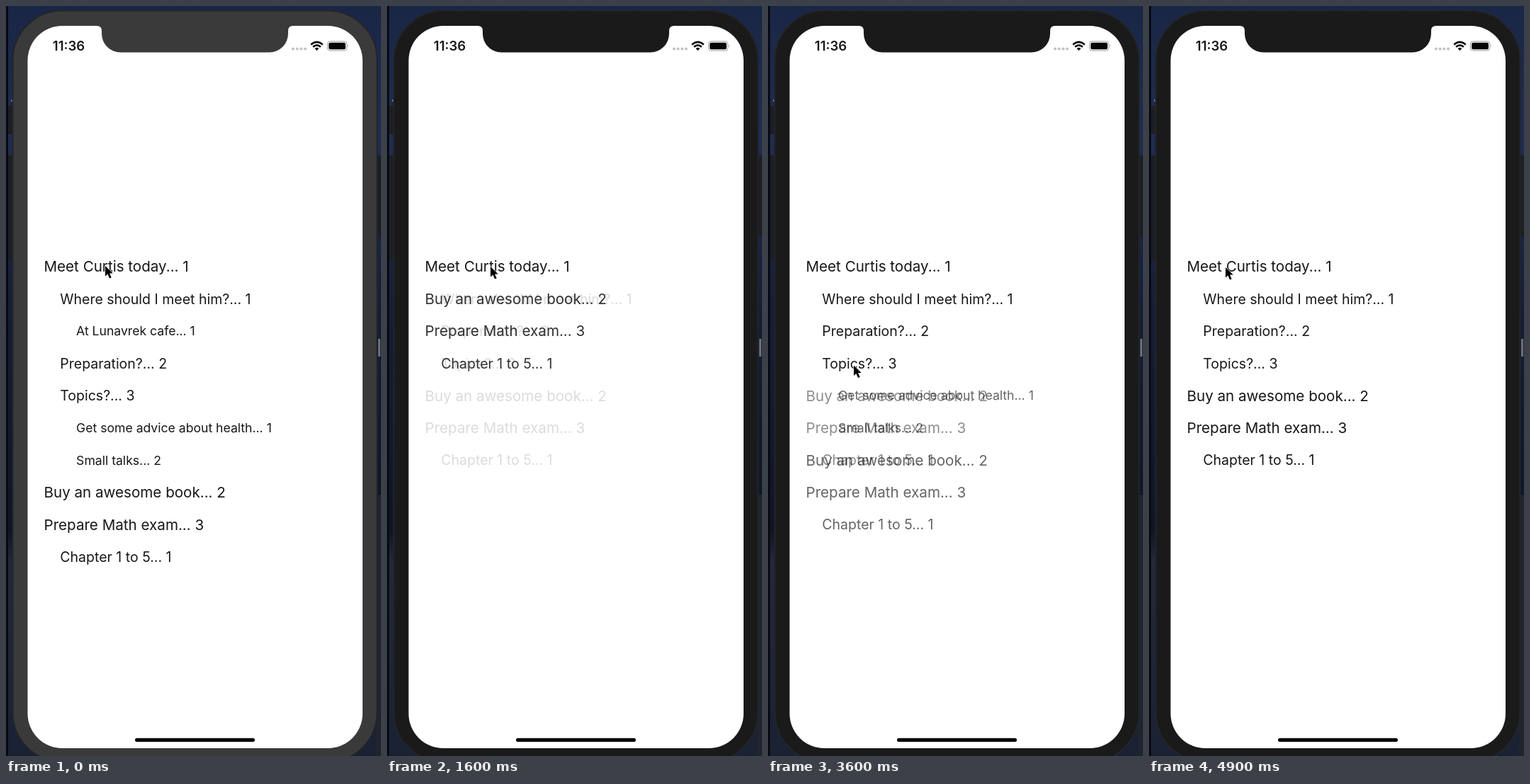
Write an HTML page that moves like this. It is 529 px wide and 1059 px high and loops after 5000 ms.

```html
<!DOCTYPE html>
<html lang="en">
<head>
<meta charset="utf-8">
<title>Outline list</title>
<style>
  html, body { margin: 0; width: 100%; height: 100%; overflow: hidden; background: #18233f; }
  svg { display: block; width: 529px; height: 1059px; }
  text { font-family: Inter, "Open Sans", sans-serif; fill: #171717; white-space: pre; }
</style>
</head>
<body>
<svg viewBox="0 0 529 1059" xmlns="http://www.w3.org/2000/svg">
  <defs>
    <linearGradient id="desk" x1="0" y1="0" x2="0" y2="1">
      <stop offset="0" stop-color="#1a2645"/>
      <stop offset=".18" stop-color="#202d50"/>
      <stop offset=".4" stop-color="#161e36"/>
      <stop offset=".7" stop-color="#0f1525"/>
      <stop offset=".74" stop-color="#23293a"/>
      <stop offset="1" stop-color="#1a2133"/>
    </linearGradient>
  </defs>

  <rect width="529" height="1059" fill="url(#desk)"/>
  <g fill="#1d1e22">
    <rect x="3" y="141" width="8" height="40"/>
    <rect x="3" y="211" width="8" height="148"/>
    <rect x="521" y="211" width="8" height="115"/>
  </g>
  <rect x="7" y="132" width="2" height="3" fill="#77809a"/>
  <rect x="525" y="470" width="3" height="25" fill="#6d7078"/>
  <rect x="522" y="690" width="7" height="369" fill="#20242e"/>
  <rect width="3" height="1059" fill="#080b14"/>

  <rect id="body" x="9.5" y="6.5" width="514" height="1061" rx="70" stroke="#22252d" stroke-width="2"/>
  <rect x="30.5" y="28" width="472.5" height="1020" rx="49" fill="#fff"/>
  <path id="notch" d="M128 27 V28 Q135 28 135 35 V39 A26.5 26.5 0 0 0 161.5 65.5 H371.5 A26.5 26.5 0 0 0 398 39 V35 Q398 28 405 28 V27 Z"/>

  <text x="65.8" y="63.3" font-size="18.6" font-weight="600">11:36</text>
  <path d="M405 60.5 h18" stroke="#c4c4c6" stroke-width="4.2" stroke-linecap="round" stroke-dasharray="0 5.7"/>
  <g fill="none" stroke="#0a0a0a" stroke-width="2.5">
    <path d="M430.2 54.6 Q438.5 47.2 446.8 54.6"/>
    <path d="M433.1 57.7 Q438.5 53 443.9 57.7"/>
  </g>
  <path d="M435.6 59.9 Q438.5 57.6 441.4 59.9 L438.5 63 Z" fill="#0a0a0a"/>
  <rect x="453.4" y="50" width="27.4" height="13" rx="3.8" fill="none" stroke="#9b9b9d"/>
  <rect x="455.2" y="51.8" width="23.8" height="9.4" rx="2.2" fill="#050505"/>
  <path d="M482 54.3 q1.8 2.2 0 4.4 z" fill="#9b9b9d"/>

  <g id="list"></g>
  <rect x="182" y="1033.7" width="169" height="5.2" rx="2.6" fill="#050505"/>
  <path id="cursor" d="M0 0 V14.6 L3.4 11.5 L6 17.6 L8.7 16.4 L6.1 10.5 H10.8 Z"
        stroke="#fff" stroke-width="1.2" stroke-opacity=".85" paint-order="stroke"/>
</svg>

<script>
const LOOP = 5000, STEP = 100, FADE = 350;
const LEFT = 53.5, INDENT = 22.8, TOP = 368, PITCH = 45.53;
const SIZES = [20.6, 19.5, 17.6];

// Leading spaces give the outline depth
const OUTLINE = [
  "Meet Curtis today... 1",
  " Where should I meet him?... 1",
  "  At Lunavrek cafe... 1",
  " Preparation?... 2",
  " Topics?... 3",
  "  Get some advice about health... 1",
  "  Small talks... 2",
  "Buy an awesome book... 2",
  "Prepare Math exam... 3",
  " Chapter 1 to 5... 1"
].map(line => ({ label: line.trim(), depth: line.search(/\S/) }));

// Each tap sets which rows are folded
const VIEWS = [
  { at: -Infinity, folded: [] },
  { at: 500, folded: [0] },
  { at: 1560, folded: [1, 4] },
  { at: 3420, folded: [1] },
  { at: 4330, folded: [1, 4] }
];

// Straight pointer moves between rests
const MOVES = [
  { from: 500, to: 1000, x: 146, y: 368 },
  { from: 2000, to: 2200, x: 170, y: 427 },
  { from: 2200, to: 2600, x: 121, y: 472 },
  { from: 2600, to: 2900, x: 121, y: 510 },
  { from: 3400, to: 3500, x: 121, y: 507.5 },
  { from: 4500, to: 4900, x: 108, y: 369 }
];

const $ = id => document.getElementById(id);
const progress = (t, from, to) => Math.min(1, Math.max(0, (t - from) / (to - from)));

function visibleRows(folded) {
  let limit = Infinity;
  return OUTLINE.filter((row, i) => {
    if (row.depth > limit) return false;
    limit = folded.includes(i) ? row.depth : Infinity;
    return true;
  });
}

function addText(row, slot) {
  const el = document.createElementNS("http://www.w3.org/2000/svg", "text");
  const size = SIZES[row.depth];
  el.setAttribute("x", LEFT + row.depth * INDENT);
  el.setAttribute("y", TOP + slot * PITCH + size * 0.36);
  el.setAttribute("font-size", size);
  el.textContent = row.label;
  $("list").append(el);
  return el;
}

// A row that keeps its slot across views is one element and stays solid
const items = new Map();
VIEWS.forEach((view, v) => visibleRows(view.folded).forEach((row, slot) => {
  const key = row.label + slot;
  if (!items.has(key)) items.set(key, { el: addText(row, slot), views: [] });
  items.get(key).views.push(v);
}));

// The new view comes in a little faster than the old one leaves
function viewAlpha(t, v) {
  const shown = t - VIEWS[v].at;
  const gone = v + 1 < VIEWS.length ? t - VIEWS[v + 1].at : 0;
  return Math.min(1, 1.3 * progress(shown, 0, FADE)) * (1 - progress(gone, 0, FADE));
}

function pointer(t) {
  let x = 140, y = 367;
  for (const m of MOVES) {
    const p = progress(t, m.from, m.to);
    x += (m.x - x) * p;
    y += (m.y - y) * p;
  }
  return `translate(${x} ${y})`;
}

function draw(t) {
  const alpha = VIEWS.map((_, v) => viewAlpha(t, v));
  for (const { el, views } of items.values()) {
    el.setAttribute("opacity", Math.min(1, views.reduce((sum, v) => sum + alpha[v], 0)));
  }
  const g = 58 - 32 * progress(t, 0, 200);
  for (const id of ["body", "notch"]) $(id).setAttribute("fill", `rgb(${g},${g},${g})`);
  $("cursor").setAttribute("transform", pointer(t));
}

const start = performance.now();
function tick() {
  const t = Math.max(0, performance.now() - start) % LOOP;
  draw(Math.floor(t / STEP) * STEP);
  requestAnimationFrame(tick);
}
tick();
</script>
</body>
</html>
```
